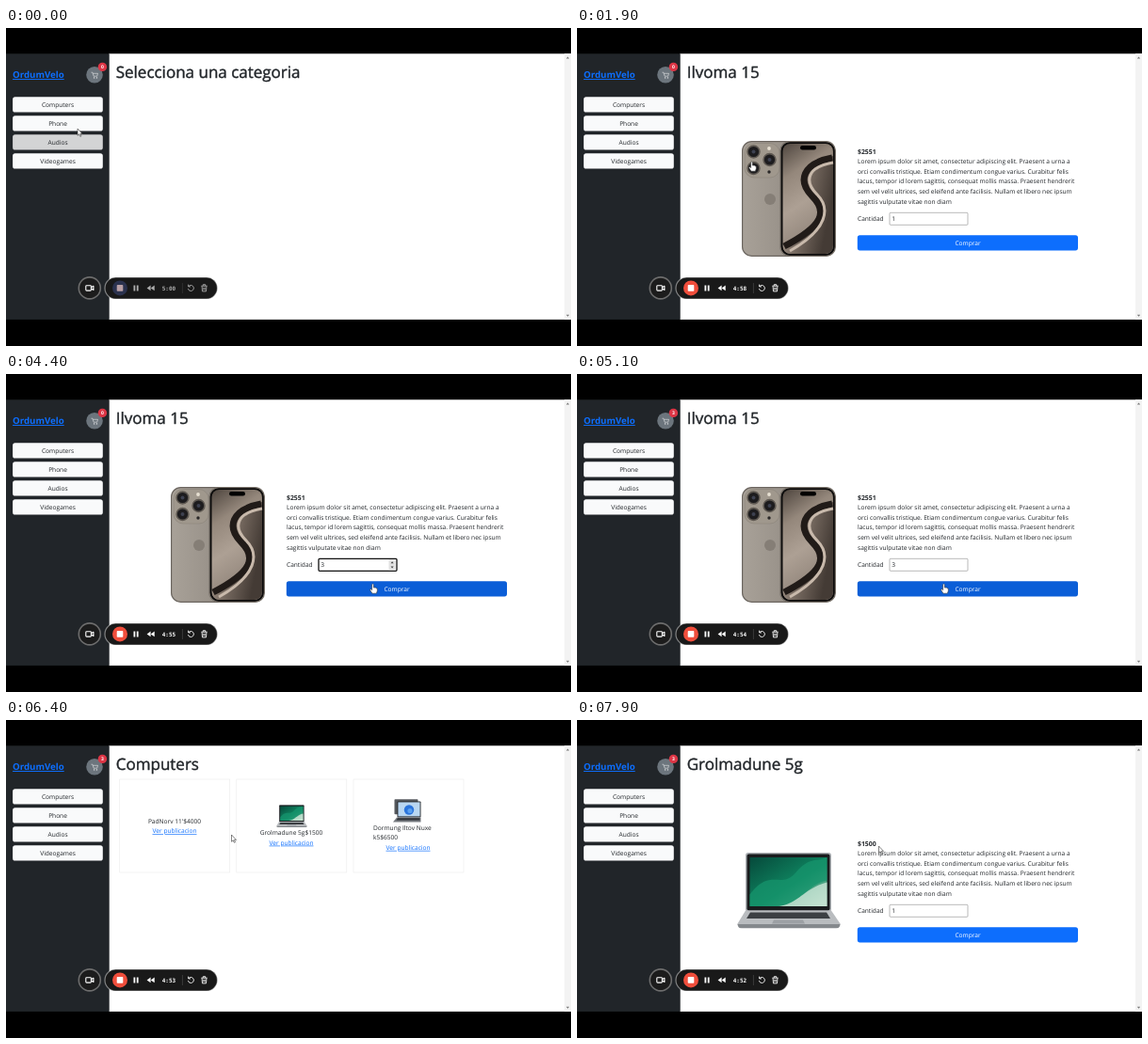
An HTML page that plays this animation: 600x338 px, repeating every 8000 ms.

```html
<!DOCTYPE html>
<html lang="es">
<head>
<meta charset="utf-8">
<title>Tienda</title>
<style>
html, body { margin: 0; width: 100%; height: 100%; overflow: hidden; background: #000; }
svg { display: block; width: 600px; height: 338px; }
text { font: 6.6px "Open Sans", "Noto Sans", sans-serif; fill: #212529; text-rendering: geometricPrecision; white-space: pre; }
.mid { text-anchor: middle; }
.h { font-size: 17px; stroke: #212529; stroke-width: .4; }
.bold { font-size: 6.9px; font-weight: 700; }
.brand { font-size: 9.7px; font-weight: 700; fill: #0d6efd; text-decoration: underline; }
.link { fill: #0d6efd; text-decoration: underline; }
.white { fill: #fff; }
.num { font: 700 5px "Open Sans", "Noto Sans", sans-serif; fill: #fff; }
.clock { font: 700 6px "DejaVu Sans Mono", monospace; fill: #fff; }
.card { fill: #fff; stroke: #ececec; stroke-width: .6; }
</style>
</head>
<body>
<svg viewBox="0 0 600 338">
  <defs>
    <linearGradient id="titan"><stop stop-color="#a8a198"/><stop offset="1" stop-color="#938c84"/></linearGradient>
    <linearGradient id="dusk" x2=".3" y2="1"><stop stop-color="#4f463f"/><stop offset=".3" stop-color="#94877b"/><stop offset=".6" stop-color="#ada094"/><stop offset="1" stop-color="#8d8177"/></linearGradient>
    <linearGradient id="sand" x2="1" y2=".4"><stop stop-color="#b5a699"/><stop offset=".5" stop-color="#7b6e64"/><stop offset="1" stop-color="#443b35"/></linearGradient>
    <linearGradient id="leaf" x2="1" y2="1"><stop stop-color="#06493b"/><stop offset=".55" stop-color="#0f8560"/><stop offset="1" stop-color="#9bd0b4"/></linearGradient>
    <linearGradient id="sky" x2="1" y2="1"><stop stop-color="#2f8fe0"/><stop offset=".5" stop-color="#7fbdf0"/><stop offset="1" stop-color="#f0603c"/></linearGradient>
    <linearGradient id="rose" x2="1" y2="1"><stop stop-color="#d9cdb4"/><stop offset=".5" stop-color="#d5806d"/><stop offset="1" stop-color="#b9c3a4"/></linearGradient>

    <symbol id="phoneA" viewBox="0 0 100 123">
      <rect x=".6" y=".6" width="60" height="121.8" rx="10" fill="url(#titan)" stroke="#6b655f" stroke-width="1.2"/>
      <rect x="3" y="2.500" width="37" height="36.500" rx="10" fill="#a0988d" stroke="#8a837a" stroke-width=".6"/>
      <g fill="#1d1c1e" stroke="#5f5952" stroke-width="1.6">
        <circle cx="12.5" cy="11.5" r="6.4"/><circle cx="12.5" cy="29" r="6.4"/><circle cx="29.5" cy="20" r="6.4"/>
      </g>
      <g fill="#3d4150"><circle cx="12.5" cy="11.5" r="2"/><circle cx="12.5" cy="29" r="2"/><circle cx="29.5" cy="20" r="2"/></g>
      <circle cx="29" cy="8" r="1.9" fill="#e7e0d2"/><circle cx="29" cy="33" r="1.7" fill="#2a2828"/>
      <circle cx="30" cy="62" r="6" fill="#857e76"/>
      <rect x="41" y=".6" width="58.4" height="121.8" rx="10" fill="#0c0b0b" stroke="#79726a" stroke-width="1.2"/>
      <rect x="43.500" y="3" width="53.4" height="117" rx="8" fill="url(#dusk)"/>
      <path d="M97 16C66 22 61 42 77 58S90 92 44 114Q46 120 54 120H89Q97 119 97 111Z" fill="url(#sand)"/>
      <path d="M96 18C64 24 59 43 75 59S87 90 45 112" fill="none" stroke="#211b18" stroke-width="7"/>
      <path d="M97 23C69 28 66 43 80 57S92 94 51 117" fill="none" stroke="#c8b9ab" stroke-width="3"/>
      <rect x="62" y="5" width="17" height="4.600" rx="2.300" fill="#000"/>
    </symbol>

    <symbol id="phoneB" viewBox="0 0 31 36">
      <rect x=".3" y=".3" width="17" height="35" rx="2.500" fill="#33363b"/>
      <rect x="1.500" y="2" width="8" height="11" rx="2" fill="#191b1e"/>
      <circle cx="4.500" cy="5" r="1.700" fill="#555c66"/><circle cx="4.500" cy="9.800" r="1.700" fill="#555c66"/>
      <rect x="13" y="1" width="17.500" height="35" rx="2.500" fill="#15171b"/>
      <rect x="14" y="2" width="15.500" height="32.500" rx="1.700" fill="url(#sky)"/>
      <circle cx="22" cy="19" r="6" fill="#e8543d"/><circle cx="19" cy="25" r="4" fill="#2457a5"/>
    </symbol>

    <symbol id="phoneC" viewBox="0 0 25 29">
      <rect width="14" height="28.500" rx="2.200" fill="#17181b"/>
      <circle cx="6" cy="6.500" r="4" fill="#33353a"/><circle cx="6" cy="6.500" r="1.600" fill="#0b0b0c"/>
      <rect x="11" y=".3" width="13.700" height="28.500" rx="2.200" fill="#1b1716"/>
      <rect x="11.800" y="1.100" width="12.100" height="27" rx="1.600" fill="url(#rose)"/>
      <circle cx="17" cy="10" r="3.200" fill="#cf463f"/><circle cx="20" cy="19" r="2.600" fill="#d65a4c"/>
    </symbol>

    <symbol id="laptopA" viewBox="0 0 110 81">
      <rect x="9" y=".5" width="91" height="63" rx="3" fill="#a9adb1"/>
      <rect x="10.500" y="2" width="88" height="60" rx="2" fill="#191b1d"/>
      <rect x="13.500" y="5.500" width="82" height="52" fill="url(#leaf)"/>
      <path d="M13.500 45C36 16 46 40 62 22S84 11 95.500 5.500V30C74 34 68 56 42 57.500H13.500Z" fill="#16946d" opacity=".75"/>
      <path d="M45 57.500C66 54 72 38 95.500 32V57.500Z" fill="#d5eadc" opacity=".75"/>
      <path d="M9 62H100L109.500 76Q109.500 80 105 80H5Q.500 80 .500 76Z" fill="#b9bcbf"/>
      <path d="M14 64H95L99 70.500H10Z" fill="#3c3f43"/>
      <path d="M39 72H70L72 76H37Z" fill="#9da1a5"/>
      <path d="M.500 76.500H109.500Q109 81 105 81H5Q1 81 .500 76.500Z" fill="#85898d"/>
    </symbol>

    <symbol id="laptopB" viewBox="0 0 30 25">
      <rect x="1.500" y=".3" width="25" height="16" rx=".8" fill="#55585d"/>
      <rect x="4.500" y="2.500" width="25" height="17" rx=".8" fill="#23262b"/>
      <rect x="5.400" y="3.400" width="23.200" height="15" fill="#b9d7f2"/>
      <circle cx="17" cy="11.500" r="5.200" fill="#2b74dc"/><circle cx="18" cy="12.500" r="2.600" fill="#5aa0ef"/>
      <path d="M4 19.500H29.500V24.500H0Z" fill="#777b80"/><path d="M5 20.200H28.500V22.400H3.500Z" fill="#303338"/>
    </symbol>
  </defs>

  <rect width="600" height="338"/>
  <rect x="109" y="27.300" width="491" height="282.600" fill="#fff"/>
  <rect y="27.300" width="109.700" height="282.600" fill="#212529"/>
  <rect x="593" y="27.300" width="7" height="282.600" fill="#f3f3f3"/>
  <path d="M594.800 32.500h3.400l-1.700-2ZM594.800 304.800h3.400l-1.700 2Z" fill="#777"/>

  <text class="brand" x="7" y="53">OrdumVelo</text>
  <circle cx="94" cy="49.800" r="8.800" fill="#6c757d"/>
  <g opacity=".85">
    <path d="M90.500 47.200h1.400l1.200 4h3.600l.8-2.900h-5.200" fill="none" stroke="#fff" stroke-width=".6" stroke-linejoin="round"/>
    <circle cx="93.600" cy="52.900" r=".7" fill="#fff"/><circle cx="96.400" cy="52.900" r=".7" fill="#fff"/>
  </g>
  <circle cx="102.400" cy="41.400" r="4.700" fill="#dc3545"/>
  <text class="num mid" id="badge" x="102.400" y="43.200">0</text>

  <g id="menu"></g>
  <text class="h" id="title" x="116.700" y="52.500"></text>
  <g id="phones"></g>
  <g id="computers"></g>
  <g id="detail">
    <use id="bigPhone" href="#phoneA" x="175" y="120" width="100" height="123"/>
    <use id="bigLaptop" href="#laptopA" x="170" y="140.500" width="110" height="81"/>
    <text class="bold" id="price" x="298" y="133.800"></text>
    <g id="lorem"></g>
    <text x="298" y="205.300">Cantidad</text>
    <rect id="field" x="332" y="196.300" width="83" height="13" rx="1" fill="#fff"/>
    <text id="qty" x="334.200" y="205.300"></text>
    <g id="spin">
      <rect x="406.500" y="197.300" width="7.200" height="11" fill="#e2e2e2"/>
      <path d="M408.600 201.300h3l-1.500-2ZM408.600 204.600h3l-1.500 2Z" fill="#444"/>
    </g>
    <rect id="buy" x="297.800" y="220.200" width="234.200" height="16.200" rx="2.600"/>
    <text class="mid white" x="415" y="230.900">Comprar</text>
  </g>

  <circle cx="88.800" cy="276.400" r="11.500" fill="#1c1c1c" stroke="#6d6d6d" stroke-width="1.600"/>
  <g fill="none" stroke="#fff" stroke-width="1.100" stroke-linejoin="round">
    <rect x="84.800" y="273.700" width="5.600" height="5.400" rx=".8"/><path d="M90.400 275.800l2.500-1.500v4.200l-2.500-1.500"/>
  </g>
  <rect x="105" y="265" width="119.500" height="23" rx="11.500" fill="#191919" stroke="#fff" stroke-opacity=".45" stroke-width="1.200"/>
  <circle id="rec" cx="121" cy="276.400" r="8"/>
  <rect id="stop" x="117.700" y="273.100" width="6.600" height="6.600" rx=".8"/>
  <g id="tools">
    <path d="M135.500 273.400h1.800v6h-1.800ZM138.800 273.400h1.800v6h-1.800ZM153.600 273.500v5.800l-4-2.900ZM157.700 273.500v5.800l-4-2.900Z" fill="#fff"/>
    <text class="clock" id="clock" x="165.700" y="278.500"></text>
    <path d="M187.400 271v11" stroke="#4a4a4a" stroke-width=".7"/>
    <path d="M194 274.600a3 3 0 1 1-.6 2.500M193.600 272.600v2.300h2.300M207.300 274.200h6.400M209.300 274v-1.300h2.400v1.300M208.100 274.500l.4 5.400h4l.4-5.400M209.900 275.800v2.600M211.100 275.800v2.600" fill="none" stroke="#fff" stroke-width=".9"/>
  </g>

  <g id="cursor">
    <path id="arrow" d="M0 0V7.300L1.700 5.800 2.800 8.300 4 7.800 2.900 5.400H5Z" fill="#fff" stroke="#333" stroke-width=".6"/>
    <path id="hand" d="M-.9.800Q0-.6.900.800V4.100Q1.700 3.500 2.400 4.300 3.200 3.800 3.700 4.700 4.700 4.500 4.800 5.500V7.500L3.900 10.200H-.6L-2.800 6.700Q-3 5.400-1.900 5.700L-.9 6.600Z" fill="#fff" stroke="#333" stroke-width=".6"/>
  </g>
</svg>

<script>
const $ = id => document.getElementById(id);
const LOOP = 8000, STEP = 100;

const text = (x, y, s, cls = "") => `<text class="${cls}" x="${x}" y="${y}">${s}</text>`;
const photo = (id, x, y, w, h) => `<use class="photo" href="#${id}" x="${x}" y="${y}" width="${w}" height="${h}"/>`;
const link = (x, y) => text(x, y, "Ver publicacion", "mid link");
const cards = h => [120.7, 244.800, 369].map(x => `<rect class="card" x="${x}" y="63" width="117" height="${h}"/>`).join("");

$("menu").innerHTML = ["Computers", "Phone", "Audios", "Videogames"].map((s, i) =>
  `<rect x="7.100" y="${73.3 + i * 20}" width="95.700" height="16.300" rx="2.600"/>` + text(55, 84 + i * 20, s, "mid")).join("");
const buttons = $("menu").querySelectorAll("rect");

$("phones").innerHTML = cards(104) +
  photo("phoneA", 164, 86, 30, 37) + text(179, 132.800, "Ilvoma 15$2551", "mid") + link(179, 143.3) +
  photo("phoneB", 288, 86, 31, 36) + text(303, 132, "Tirvom 10$1500", "mid") + link(303, 142.500) +
  photo("phoneC", 415, 90, 25, 29) + text(427, 129, "Nubran 8M$4000", "mid") + link(427, 139.500);

$("computers").innerHTML = cards(99) +
  text(179, 109.800, "PadNorv 11'$4000", "mid") + link(179, 120.300) +
  photo("laptopA", 287, 90, 33, 24) + text(303, 122.100, "Grolmadune 5g$1500", "mid") + link(303, 132.600) +
  photo("laptopB", 411, 84, 30, 25) + text(390, 116.800, "Dormung Iltov Nuxe") + text(390, 127.300, "k5$6500") + link(427, 137.800);

$("lorem").innerHTML = [
  "Lorem ipsum dolor sit amet, consectetur adipiscing elit. Praesent a urna a",
  "orci convallis tristique. Etiam condimentum congue varius. Curabitur felis",
  "lacus, tempor id lorem sagittis, consequat mollis massa. Praesent hendrerit",
  "sem vel velit ultrices, sed eleifend ante facilisis. Nullam et libero nec ipsum",
  "sagittis vulputate vitae non diam"
].map((s, i) => text(298, 144.2 + i * 10.6, s)).join("");

// time, x, y of the pointer tip
const path = [
  [0, 76, 107], [200, 73, 103], [600, 72, 103], [1000, 147.5, 127.5], [1300, 180, 140],
  [1600, 185.5, 142], [1900, 185.5, 142], [2300, 215, 160], [2800, 360, 197], [3200, 413, 202],
  [3900, 413, 202], [4400, 389.5, 223], [5300, 389.5, 223], [5800, 70, 80], [6050, 70, 80],
  [6400, 239.5, 122], [6900, 292, 129], [7500, 320.5, 134], [8000, 320.5, 134]
];
const handSpans = [[100, 700], [1000, 2000], [4300, 5400], [5700, 6200], [6800, 7900]];

const within = (t, a, b) => t >= a && t < b;
const clamp = v => Math.min(1, Math.max(0, v));
const mix = (a, b, k) => `rgb(${a.map((v, i) => Math.round(v + (b[i] - v) * k))})`;
const show = (id, on) => { $(id).style.display = on ? "" : "none"; };
// hover amount with 150 ms transitions
const hover = (t, a, b) => Math.min(clamp((t - a) / 150), clamp((b + 150 - t) / 150));

function pointer(t) {
  const i = path.findIndex((p, n) => n && t < p[0]);
  const [t0, x0, y0] = path[i - 1], [t1, x1, y1] = path[i];
  let k = (t - t0) / (t1 - t0);
  k = k * k * (3 - 2 * k);
  return [x0 + (x1 - x0) * k, y0 + (y1 - y0) * k];
}

function draw(t) {
  const phones = within(t, 800, 1900), item = within(t, 1900, 6100);
  const computers = within(t, 6100, 7900), laptop = t >= 7900;
  $("title").textContent = t < 800 ? "Selecciona una categoria" : phones ? "Phone"
    : item ? "Ilvoma 15" : computers ? "Computers" : "Grolmadune 5g";
  show("phones", phones);
  show("computers", computers);
  show("detail", item || laptop);
  show("bigPhone", item);
  show("bigLaptop", laptop);
  document.querySelectorAll(".photo").forEach(p => {
    p.style.display = phones && t < 900 || computers && t < 6200 ? "none" : "";
  });

  $("price").textContent = laptop ? "$1500" : "$2551";
  $("qty").textContent = laptop || t < 3500 ? 1 : t < 3800 ? 2 : 3;
  const focus = within(t, 3300, 4500);
  $("field").setAttribute("stroke", focus ? "#111" : "#8a8a8a");
  $("field").setAttribute("stroke-width", focus ? 1.3 : .6);
  show("spin", within(t, 3200, 4500));
  $("buy").setAttribute("fill", mix([13, 110, 253], [11, 94, 215], hover(t, 4200, 5400)));
  $("badge").textContent = t < 4500 ? 0 : 3;

  const lit = [hover(t, 5700, 6200), hover(t, 0, 1000), hover(t, -200, 0), 0];
  buttons.forEach((b, i) => b.setAttribute("fill", mix([249, 250, 251], [211, 212, 213], lit[i])));

  const on = clamp(t / 300);
  $("rec").setAttribute("fill", mix([43, 50, 78], [240, 78, 60], on));
  $("stop").setAttribute("fill", mix([185, 160, 165], [255, 255, 255], on));
  $("tools").setAttribute("opacity", .65 + .35 * on);
  const left = 300 - Math.floor((t + 900) / 1000);
  $("clock").textContent = `${Math.floor(left / 60)}:${String(left % 60).padStart(2, "0")}`;

  const hand = handSpans.some(([a, b]) => within(t, a, b));
  show("hand", hand);
  show("arrow", !hand);
  $("cursor").setAttribute("transform", `translate(${pointer(t)})`);
}

const start = performance.now();
function tick() {
  const t = (performance.now() - start) % LOOP;
  draw(Math.floor(t / STEP) * STEP);
  requestAnimationFrame(tick);
}
tick();
</script>
</body>
</html>
```
